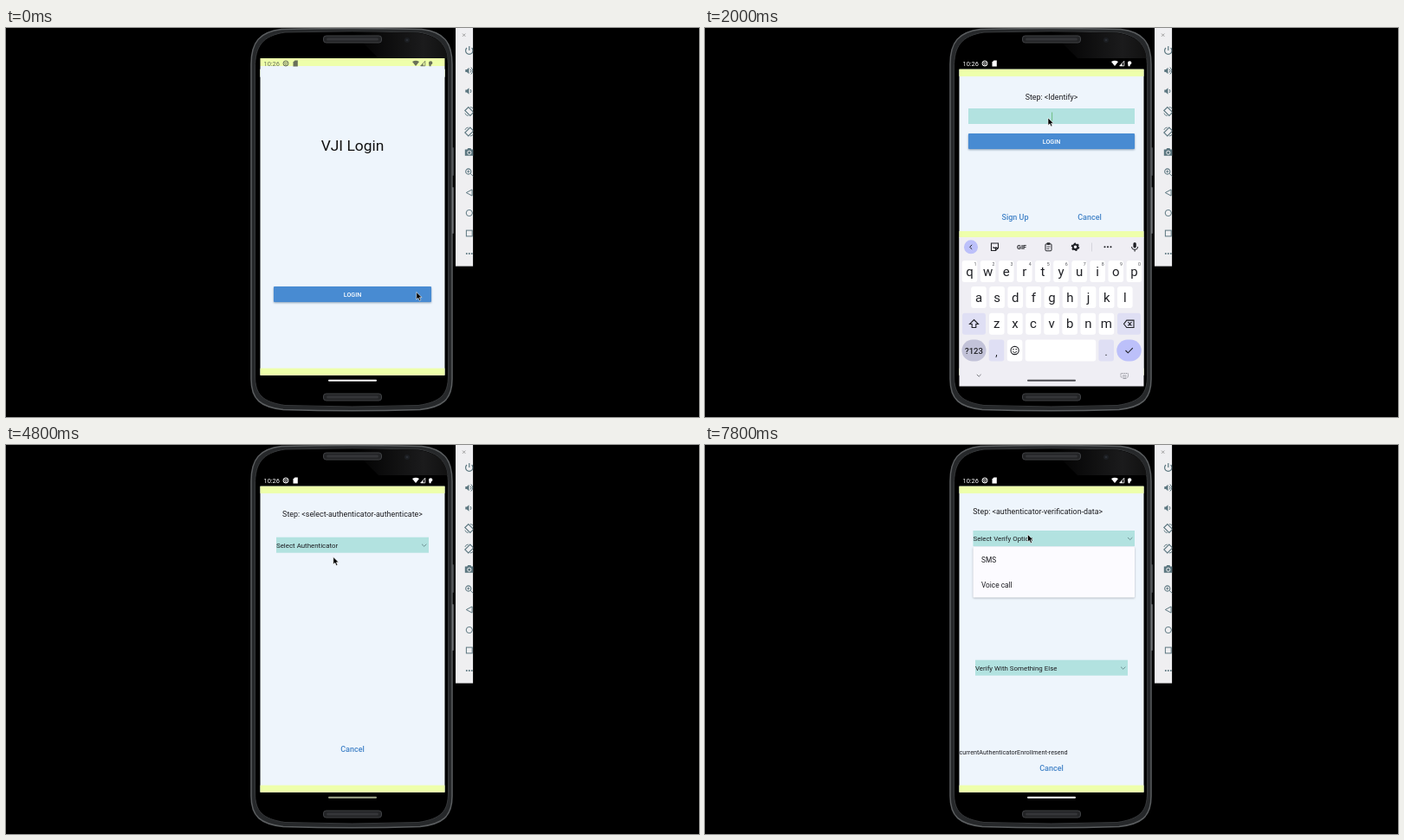
Animation of 800x450 px, one loop 8 s. Source, as an HTML page:

```html
<!DOCTYPE html>
<html lang="en">
<head>
<meta charset="utf-8">
<title>Login flow</title>
<style>
html, body { margin: 0; width: 100%; height: 100%; overflow: hidden; background: #000; }
svg { display: block; width: 100vw; height: 100vh; }
text { font-family: Roboto, sans-serif; }
</style>
</head>
<body>
<svg id="stage" viewBox="0 0 800 450"></svg>
<script>
const LOOP = 8000, STEP = 200;
const EMAIL = 'lumeda.ar3@example.com';
const BG = '#eef5fc', LIME = '#eeffab', TEAL = '#b2e2e0', BLUE = '#488bd2', INK = '#1c1c20';

const rect = (x, y, w, h, fill, rx = 0, more = '') =>
  `<rect x="${x}" y="${y}" width="${w}" height="${h}" rx="${rx}" fill="${fill}" ${more}/>`;
const text = (x, y, size, str, fill = INK, more = '') =>
  `<text x="${x}" y="${y}" font-size="${size}" fill="${fill}" ${more}>${str.replace(/</g, '&lt;')}</text>`;
const mid = (x, y, size, str, fill, more = '') => text(x, y, size, str, fill, 'text-anchor="middle" ' + more);
const line = (d, color, w = 1, more = '') =>
  `<path d="${d}" fill="none" stroke="${color}" stroke-width="${w}" ${more}/>`;
const shape = (d, fill) => `<path d="${d}" fill="${fill}"/>`;
const dot = (x, y, r, fill, more = '') => `<circle cx="${x}" cy="${y}" r="${r}" fill="${fill}" ${more}/>`;
const at = (x, y, body) => `<g transform="translate(${x} ${y})">${body}</g>`;
const group = (id, body) => `<g id="${id}">${body}</g>`;
const shadow = 'filter="url(#soft)"';

function phone() {
  const body = 'M283 42C283 16 293 4.5 318 1.5Q400 -.3 480 1.5C505 4.5 515 16 515 42V406C515 430 504 438.5 478 441.5Q400 444 320 441.5C294 438.5 283 430 283 406Z';
  const inner = 'M287.5 46C287.5 21 296 9 322 5Q400 2.6 476 5C502 9 510.5 21 510.5 46V402C510.5 424 502 432.5 476 436.5Q400 439.5 322 436.5C296 432.5 287.5 424 287.5 402Z';
  const slot = y => rect(366.5, y, 67, 8, '#232426', 3, 'stroke="#404245"') +
    rect(370, y + 2.5, 60, 3, '#343538', 1.5);
  return `<path d="${body}" fill="#26282a" stroke="#5b5e60" stroke-width="1.5"/>` +
    `<path d="${inner}" fill="#000" stroke="#36383a"/>` +
    shape('M400 5Q440 4 476 6C499 9 509 21 509.5 35H430Z', 'url(#glare)') +
    slot(9) + slot(423) + dot(463, 14, 3, '#1c1e22') + dot(463, 14, 1.3, '#2a2d34') +
    rect(515, 138, 1.7, 33, '#56595c', 1) + rect(515, 184, 1.7, 54, '#707376', 1);
}

function sidebar() {
  const c = '#5c7780';
  const speaker = shape('M-4.5 -1.6H-2.8L-.3 -3.8V3.8L-2.8 1.6H-4.5Z', c);
  const tilt = line('M-5 -1L-1 -5L5 1L1 5Z', c, 1.1);
  const icons = [
    line('M-2.8 -3A4.2 4.2 0 1 0 2.8 -3M0 -5V0', c, 1.2),
    speaker + line('M1.3 -2Q3.2 0 1.3 2M2 -4Q6 0 2 4', c),
    speaker + line('M1.3 -2Q3.2 0 1.3 2', c),
    tilt + line('M1 -5Q4.5 -5 5 -2M-5 2Q-4 5 -1 5', c, .9),
    `<g transform="scale(-1 1)">${tilt}</g>` + line('M-5 -2Q-4 -5 -1 -5M1 5Q4 5 5 2', c, .9),
    shape('M-5 -3H-2.5L-1.5 -4.5H1.5L2.5 -3H5V4.3H-5Z', c) + dot(0, .7, 2.1, 'none', 'stroke="#efeff1" stroke-width="1"'),
    dot(-1, -1, 3.1, 'none', `stroke="${c}" stroke-width="1.1"`) + line('M1.3 1.3L4.8 4.8M-2.5 -1H.5M-1 -2.5V.5', c),
    line('M3.3 -3.6V3.6L-3.5 0Z', c),
    dot(0, 0, 3.6, 'none', `stroke="${c}"`),
    rect(-3.4, -3.4, 6.8, 6.8, 'none', 0, `stroke="${c}"`),
    [-3, 0, 3].map(x => dot(x, 0, 1, c)).join('')
  ];
  return `<g clip-path="url(#bar)">` + rect(519, 0, 20.3, 275.6, '#efeff1') +
    line('M527 6.5l3.3 3.3m0 -3.3l-3.3 3.3', '#888', .8) +
    icons.map((icon, i) => at(534.8, 26 + i * 23.5, icon)).join('') + '</g>';
}

function statusBar() {
  return text(297.5, 43.8, 7.4, '10:26', 'currentColor') +
    dot(323, 41, 3, 'none', 'stroke="currentColor"') + line('M321 40.3h4M321.5 42.3h3', 'currentColor', .9) +
    shape('M331.5 39.5l2 -2h3.3v7h-5.3z', 'currentColor') +
    shape('M469 39Q473 36.3 477 39L473 44Z', 'currentColor') +
    line('M478.7 43.8H483.8V38.3Z', 'currentColor', .8) + shape('M478.7 44L481.6 41V44Z', 'currentColor') +
    shape('M488 40.3Q488 38.3 490.2 38.3T492.4 40.3Q492.4 42 490.6 42.4V44.2H488.6Z', 'currentColor');
}

const button = (x, y, w) =>
  rect(x, y + 1, w, 18, '#8ba0b6', 1, shadow) + rect(x, y, w, 18, BLUE, 1) +
  mid(400, y + 11.6, 7.1, 'LOGIN', '#fff', 'font-weight="500"');
const link = (x, y, str) => mid(x, y, 9, str, '#4283c8', 'font-weight="500"');
const select = (x, y, w, str) => rect(x, y, w, 18, TEAL) + text(x, y + 11.9, 7.9, str) +
  line(`M${x + w - 8} ${y + 8}l2.7 2.6l2.7 -2.6`, '#66878a', .9);
const menu = (x, y, w, h, items, dx, dy) =>
  rect(x, y + .7, w, h, '#a9b0b8', 1, shadow) + rect(x, y, w, h, '#fcfbff', 1) +
  items.map((s, i) => text(x + dx, y + dy + i * 29, 8.3, s)).join('');

function keyboard() {
  const k = '#202126', soft = '#dfdff4', accent = '#bcc0fa';
  const key = (x, y, w, fill = '#fff', rx = 3) => rect(x - w / 2, y - 12.5, w, 25, fill, rx);
  const row = (keys, x, y) => [...keys].map((ch, i) =>
    key(x + i * 21.1, y, 17.6) + mid(x + i * 21.1, y + 5, 15, ch, k)).join('');
  const digits = [...'1234567890'].map((n, i) => mid(312 + i * 21.05, 275.3, 5.3, n, '#55565c')).join('');
  const bar = dot(307, 253.3, 8, accent) + line('M308.2 250.8l-2.5 2.5l2.5 2.5', k) +
    line('M330.5 249h8v5.5l-3 3h-5zM338.5 254.5h-3v3M332.5 253.5q2 2 4 0', k, 1.1) +
    mid(365.5, 256, 7.2, 'GIF', k, 'font-weight="700"') +
    rect(393, 249.8, 7, 8, 'none', 1, `stroke="${k}"`) + rect(394.7, 248.3, 3.6, 2.5, k) +
    line('M394.5 253h4M394.5 255.3h3', k, .8) +
    dot(427.5, 253.3, 2.8, 'none', `stroke="${k}" stroke-width="2"`) +
    dot(427.5, 253.3, 4.1, 'none', `stroke="${k}" stroke-width="1.4" stroke-dasharray="2.1 2.19"`) +
    rect(446, 248.5, .7, 10, '#cbcbd2') + [461.5, 465, 468.5].map(x => dot(x, 253.3, 1.05, k)).join('') +
    rect(494.4, 248, 3.4, 6.5, k, 1.7) + line('M492.5 253q0 3.5 3.6 3.5t3.6 -3.5M496.1 256.5v2.2', k);
  const bottom = key(310.5, 373, 28, '#c2c2d8', 12.5) + mid(310.5, 376.6, 9.6, '?123', k, 'font-weight="500"') +
    key(336.5, 373, 17.6, soft) + mid(336.5, 378.5, 12, ',', k) +
    key(357.6, 373, 17.6) + dot(357.6, 373, 4.6, 'none', `stroke="${k}" stroke-width="1.1"`) +
    dot(356, 371.8, .8, k) + dot(359.2, 371.8, .8, k) + line('M355.3 374.3q2.3 2.6 4.6 0', k) +
    key(410.5, 373, 81.5) + key(463.2, 373, 17.6, soft) + mid(463.2, 378.5, 12, '.', k) +
    key(489.5, 373, 28.5, accent, 12.5) + line('M485.5 373l2.8 2.8l5.5 -5.6', k, 1.1);
  return rect(293.5, 235, 213, 7.5, LIME) + rect(293.5, 242, 213, 172.5, '#efeef4') + bar +
    row('qwertyuiop', 305.5, 281.5) + digits + row('asdfghjkl', 316, 311.5) + row('zxcvbnm', 336.8, 342.3) +
    key(310.5, 342.3, 27, soft) + line('M310.5 337.5l5 5h-2.7v4h-4.6v-4h-2.7z', k, 1.1) +
    key(489.5, 342.3, 27, soft) + line('M483.5 342.3l3.3 -4.2h8.2v8.4h-8.2zM488.3 340.2l4.2 4.2m0 -4.2l-4.2 4.2', k, 1.1) +
    bottom + line('M313.8 400.8l2.4 2.4l2.4 -2.4', '#6a6b72', .9) +
    rect(480, 399.5, 8.5, 4.5, 'none', .5, 'stroke="#8a8b92" stroke-width=".9" stroke-dasharray="1.2 .6"') +
    line('M482 402h4.5M482.5 405.5h4', '#8a8b92', .8);
}

const home = rect(293.5, 35, 213, 9, LIME) + rect(293.5, 44, 213, 13, BG) +
  mid(400, 141.5, 17.4, 'VJI Login', '#111') + button(309, 299, 182);

const identify = mid(400, 82.8, 8.9, 'Step: <Identify>') + rect(304, 93, 192, 18, TEAL) +
  `<text id="email" x="400" y="104.8" font-size="7.9" fill="#37474a" text-anchor="middle"></text>` +
  `<rect id="caret" y="97.5" width=".8" height="10" fill="#5fb56c"/>` +
  button(304, 122, 192) + link(358, 222, 'Sign Up') + link(444, 222, 'Cancel');

const choose = mid(400, 82.8, 8.9, 'Step: <select-authenticator-authenticate>') +
  select(312, 106.7, 176, 'Select Authenticator') + link(400, 355, 'Cancel');

const verify = text(309.3, 80.3, 8.9, 'Step: <authenticator-verification-data>') +
  select(309.5, 99, 186.5, 'Select Verify Option') + select(312, 248.7, 176, 'Verify With Something Else') +
  text(293.5, 358, 7.25, 'currentAuthenticatorEnrollment-resend') + link(400, 377.3, 'Cancel');

const stage = document.getElementById('stage');
stage.innerHTML = `<defs><clipPath id="bar"><path d="M519 0h20.3v276h-20.3z"/></clipPath>
  <linearGradient id="glare"><stop stop-color="#000"/><stop offset=".75" stop-color="#1b1b1c"/><stop offset="1" stop-color="#111"/></linearGradient>
  <filter id="soft" x="-5%" y="-30%" width="110%" height="160%"><feGaussianBlur stdDeviation=".8"/></filter></defs>` +
  rect(0, 0, 800, 450, '#000') + phone() + sidebar() + rect(293.5, 35, 213, 13, '#000') +
  rect(293.5, 47.7, 213, 354, BG) + rect(293.5, 47.7, 213, 8.2, LIME) + rect(293.5, 393.6, 213, 8.1, LIME) +
  group('home', home) + group('identify', identify) + group('choose', choose) +
  group('methods', menu(312, 125, 176, 104.5, ['Zorbeo Authenticator', 'Vafu Verify', 'Password', 'Phone'], 9.3, 13)) +
  group('verify', verify) + group('options', menu(309.5, 118, 186.5, 58.5, ['SMS', 'Voice call'], 9.5, 17.8)) +
  group('keys', keyboard()) + group('status', statusBar()) +
  '<rect id="pill" x="372" y="406.8" width="56" height="2" rx="1"/>' +
  group('pointer', '<path d="M0 0V8.6L2 6.8L3.5 10L5 9.3L3.6 6.2H6.3Z" fill="#000" stroke="#fff" stroke-width=".6"/>');

const el = {};
stage.querySelectorAll('[id]').forEach(n => el[n.id] = n);

// time, x, y of the pointer
const route = [[0, 473.8, 305.5], [400, 473.8, 305.5], [1400, 433.6, 198.5], [2000, 396, 104], [3400, 396, 104],
  [3800, 377.8, 130], [4800, 377.8, 129.5], [5400, 379, 115], [5800, 377, 117], [6600, 334.5, 224.5],
  [7000, 334.5, 224.5], [7600, 372.5, 103.5], [8000, 372.5, 103.5]];

function pointerAt(t) {
  const i = Math.max(1, route.findIndex(p => p[0] > t));
  const [t0, x0, y0] = route[i - 1], [t1, x1, y1] = route[i];
  const u = (t - t0) / (t1 - t0), e = u * u * (3 - 2 * u);
  return [x0 + (x1 - x0) * e, y0 + (y1 - y0) * e];
}

function draw(t) {
  const show = (id, from, to) => {
    const on = t >= from && t < to;
    el[id].style.display = on ? '' : 'none';
    return on;
  };
  const atHome = show('home', 0, 600);
  show('identify', 1600, 4200);
  const typing = show('keys', 2000, 4400);
  show('choose', 4800, 7400);
  show('methods', 5600, 7200);
  show('verify', 7600, LOOP);
  show('options', 7800, LOOP);
  show('caret', 1800, 4200);
  el.status.setAttribute('color', atHome ? '#69705a' : '#fff');
  el.pill.setAttribute('fill', typing ? '#4c4c52' : t >= 4400 && t < 5000 ? '#a4aa8e' : '#fff');
  const n = Math.max(0, Math.min(EMAIL.length, Math.floor((t - 2000) / 70)));
  el.email.textContent = EMAIL.slice(0, n);
  el.caret.setAttribute('x', 400.3 + (n ? el.email.getComputedTextLength() / 2 : 0));
  el.pointer.setAttribute('transform', `translate(${pointerAt(t)})`);
}

const start = performance.now();
function tick(now) {
  const t = Math.max(0, now - start) % LOOP;
  draw(Math.floor(t / STEP) * STEP);
  requestAnimationFrame(tick);
}
draw(0);
requestAnimationFrame(tick);
</script>
</body>
</html>
```
